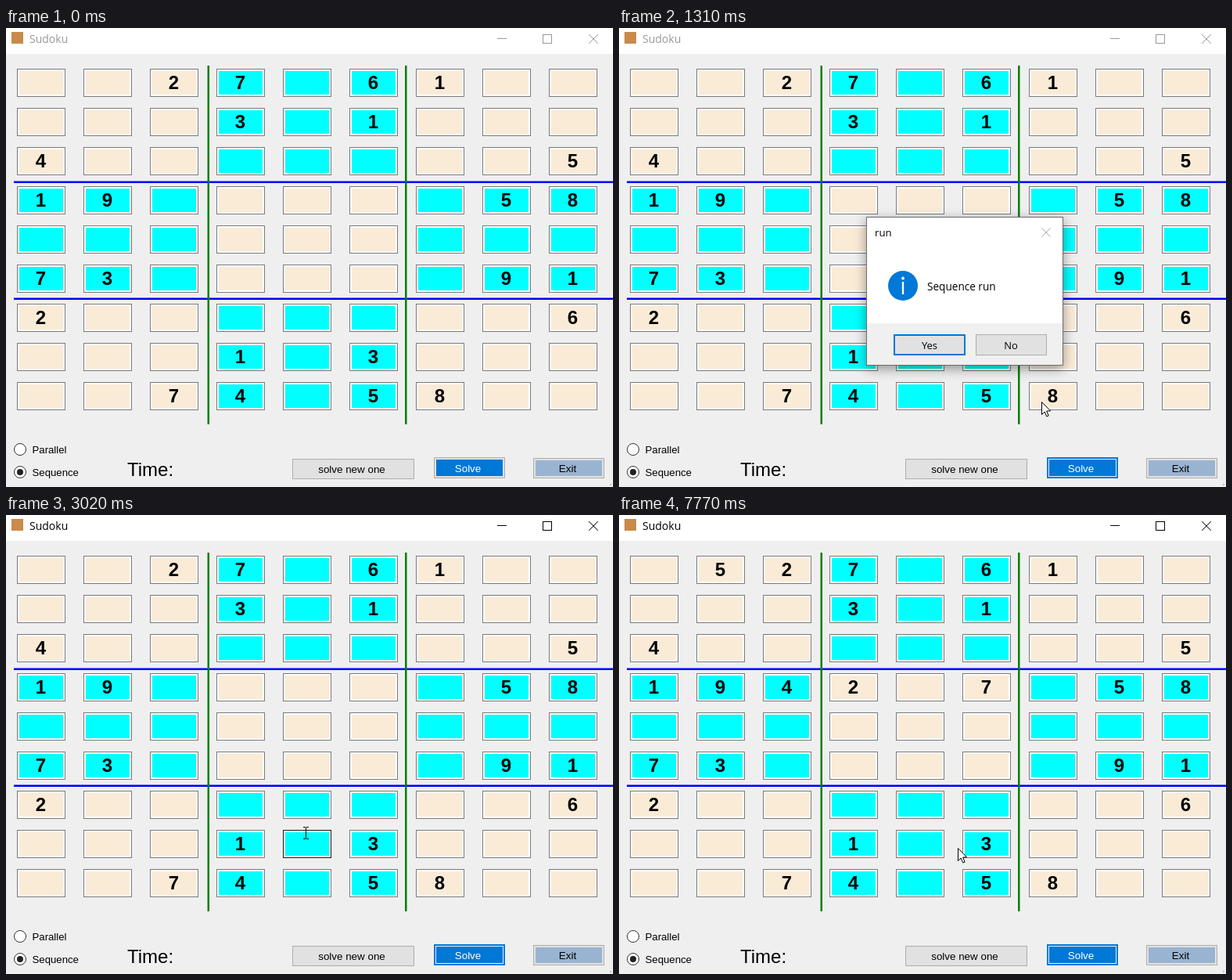
Animation, 776 px wide and 586 px high, one loop 8000 ms. Source, as an HTML page with a canvas:

```html
<!DOCTYPE html>
<html lang="en">
<head>
<meta charset="utf-8">
<title>Sudoku</title>
<style>
  html, body { margin: 0; width: 100%; height: 100%; overflow: hidden; background: #efefef; }
  canvas { display: block; }
</style>
</head>
<body>
<canvas id="stage" width="776" height="586"></canvas>
<script>
const W = 776, H = 586, LOOP = 8000, STEP = 77.8;
const stage = document.getElementById('stage').getContext('2d');
const layer = document.createElement('canvas');
layer.width = W;
layer.height = H;
const layerCtx = layer.getContext('2d');
let ctx = stage;

const SANS = '"Liberation Sans", Arial, sans-serif';
const UI = '"Open Sans", "Noto Sans", sans-serif';
const BLUE = [0, 120, 215], GRAY = [173, 173, 173], FACE = [225, 225, 225], HOT = [229, 241, 251];

const GIVEN = ['..27.61..', '...3.1...', '4.......5', '19.....58', '.........',
               '73.....91', '2.......6', '...1.3...', '..74.58..'];
const SOLVED = [
  { at: 7140, col: 1, row: 0, d: 5 },
  { at: 7370, col: 2, row: 3, d: 4 },
  { at: 7530, col: 3, row: 3, d: 2 },
  { at: 7770, col: 5, row: 3, d: 7 },
];

// The screen was sampled at a steady rate, so motion advances in even steps
const sampled = t => 58 + Math.floor((t - 46) / STEP) * STEP;
const ramp = (t, from, to) => Math.min(1, Math.max(0, (t - from) / (to - from)));
const easeOut = (p, power) => 1 - (1 - p) ** power;
const lerp = (a, b, p) => a + (b - a) * p;
const mix = (a, b, p) => `rgb(${a.map((v, i) => Math.round(lerp(v, b[i], p)))})`;

function rect(x, y, w, h, color) {
  ctx.fillStyle = color;
  ctx.fillRect(x, y, w, h);
}

function frame(x, y, w, h, border, fill, width = 1) {
  rect(x, y, w, h, border);
  rect(x + width, y + width, w - 2 * width, h - 2 * width, fill);
}

function text(str, x, y, font, color = '#000', align = 'left') {
  ctx.font = font;
  ctx.textAlign = align;
  ctx.fillStyle = color;
  ctx.fillText(str, x, y);
}

function cross(x, y, r, color) {
  ctx.strokeStyle = color;
  ctx.lineWidth = 1;
  ctx.beginPath();
  ctx.moveTo(x - r, y - r);
  ctx.lineTo(x + r, y + r);
  ctx.moveTo(x + r, y - r);
  ctx.lineTo(x - r, y + r);
  ctx.stroke();
}

function disc(x, y, r, fill, stroke) {
  ctx.beginPath();
  ctx.arc(x, y, r, 0, Math.PI * 2);
  ctx.fillStyle = fill;
  ctx.fill();
  if (stroke) {
    ctx.strokeStyle = stroke;
    ctx.lineWidth = 1;
    ctx.stroke();
  }
}

function titleBar(active) {
  const ink = active ? '#000' : '#999';
  rect(0, 0, W, 33, '#fff');
  rect(7, 5, 15, 15, '#c98a4a');
  text('Sudoku', 30, 19, `14px ${UI}`, ink);
  rect(628, 13, 12, 1, ink);
  ctx.strokeStyle = ink;
  ctx.lineWidth = 1;
  ctx.strokeRect(686.5, 8.5, 11, 11);
  cross(751, 14, 5.8, ink);
}

function digit(d, col, row) {
  text(d, 44.5 + col * 85, 78 + row * 50, `bold 24px ${SANS}`, '#000', 'center');
}

function board(t, s) {
  const hover = ramp(s, 2200, 2500) - ramp(s, 3250, 3860);
  for (let row = 0; row < 9; row++) {
    for (let col = 0; col < 9; col++) {
      const x = 14 + col * 85, y = 52 + row * 50;
      const odd = (Math.floor(row / 3) + Math.floor(col / 3)) % 2;
      const heat = row === 7 && col === 4 ? hover : 0;
      frame(x, y, 62, 36, mix([122, 122, 122], [23, 23, 23], heat), '#fff');
      rect(x + 3, y + 3, 56, 30, odd ? '#00ffff' : '#faebd7');
      if (GIVEN[row][col] !== '.') digit(GIVEN[row][col], col, row);
    }
  }
  for (const { at, col, row, d } of SOLVED) if (t >= at) digit(d, col, row);
  for (const y of [195.5, 344.5]) rect(10, y, 766, 2.5, '#0000ff');
  for (const x of [257.5, 510]) rect(x, 48, 2.5, 458, '#008000');
}

function radio(label, y, on) {
  disc(18, y, 7.5, '#fff', '#333');
  if (on) disc(18, y, 4, '#222');
  text(label, 33.5, y + 5, `13.2px ${SANS}`);
}

function footer(s) {
  const font = `13.4px ${SANS}`;
  radio('Parallel', 538, false);
  radio('Sequence', 567, true);
  text('Time:', 155, 572, `24px ${SANS}`);

  frame(366, 550, 156, 26, '#adadad', '#e1e1e1');
  text('solve new one', 442, 568, font, '#000', 'center');

  const heat = ramp(s, 220, 440);
  frame(547, 548, 91, 27, mix(GRAY, BLUE, heat), mix(FACE, HOT, heat), heat ? 2 : 1);
  rect(550, 551, 85, 21, '#0078d7');
  text('Solve', 590.5, 567, font, '#fff', 'center');

  frame(674, 549, 91, 26, '#adadad', '#e1e1e1');
  rect(677, 552, 85, 20, '#99b4d1');
  text('Exit', 718, 567, font, '#000', 'center');
  rect(772, 582, 2, 2, '#bfbfbf');
}

function dialogFace(s) {
  ctx.clearRect(0, 0, W, H);
  ctx.save();
  ctx.shadowColor = 'rgba(0,0,0,.4)';
  ctx.shadowBlur = 14;
  ctx.shadowOffsetY = 4;
  rect(316, 241, 252, 190, '#6e6e6e');
  ctx.restore();
  rect(317, 242, 250, 188, '#fff');
  rect(317, 377, 250, 53, '#f0f0f0');

  text('run', 327, 265.5, `13.2px ${UI}`);
  cross(546, 261, 5.5, '#aaa');
  disc(363, 329, 19, '#0078d7');
  disc(363, 319.5, 1.9, '#fff');
  rect(361.8, 324, 2.4, 16, '#fff');
  text('Sequence run', 394, 335, `13.6px ${UI}`);

  const yes = ramp(s, 1600, 1930);
  const no = ramp(s, 1400, 1540) - ramp(s, 1540, 1930);
  frame(351, 391, 92, 27, '#0078d7', mix(FACE, HOT, yes), 2);
  text('Yes', 397, 410, `13px ${UI}`, '#000', 'center');
  frame(456, 391, 91, 27, mix(GRAY, BLUE, no), mix(FACE, HOT, no));
  text('No', 501, 410, `13px ${UI}`, '#000', 'center');
}

function dialog(s) {
  const shown = easeOut(ramp(s, 1036, 1225), 2) - ramp(s, 2190, 2370);
  if (shown <= 0) return;
  ctx = layerCtx;
  dialogFace(s);
  ctx = stage;
  const scale = 1 - .05 * (1 - shown);
  ctx.save();
  ctx.globalAlpha = shown;
  ctx.translate(442, 335.5);
  ctx.scale(scale, scale);
  ctx.drawImage(layer, -442, -335.5);
  ctx.restore();
}

function arrow(x, y) {
  const shape = [[0, 0], [0, 16], [3.7, 12.5], [6.3, 18.5], [8.7, 17.5], [6.1, 11.6], [11, 11.3]];
  ctx.beginPath();
  for (const [dx, dy] of shape) ctx.lineTo(x + .5 + dx, y + .5 + dy);
  ctx.closePath();
  ctx.fillStyle = '#fff';
  ctx.fill();
  ctx.strokeStyle = '#000';
  ctx.lineWidth = 1;
  ctx.stroke();
}

function caret(x, y) {
  rect(x + 2, y - 6, 1, 14, '#000');
  for (const dy of [-7, 8]) {
    rect(x - 1, y + dy, 3, 1, '#000');
    rect(x + 3, y + dy, 3, 1, '#000');
  }
}

// Enters over Solve, sweeps to Yes, then drifts off to the right
function pointer(t, s) {
  if (t < 280) return;
  const enter = easeOut(ramp(s, 280, 680), 2);
  const sweep = ramp(s, 1150, 1770);
  const leave = easeOut(ramp(s, 3080, 3400), 3);
  const x = lerp(lerp(lerp(583, 569, enter), 381, sweep * sweep * (3 - 2 * sweep)), 433, leave);
  const y = lerp(lerp(lerp(564, 552, enter), 405, easeOut(sweep, 2.5)), 425, leave);
  const overCell = t >= 2240 && t < 3170;
  (overCell ? caret : arrow)(Math.round(x), Math.round(y));
}

function draw(t) {
  const s = sampled(t);
  rect(0, 0, W, H, '#efefef');
  titleBar((t >= 990 && t < 1080) || t >= 2240);
  board(t, s);
  footer(s);
  dialog(s);
  pointer(t, s);
}

let start;
function tick(now) {
  start ??= now;
  draw((now - start) % LOOP);
  requestAnimationFrame(tick);
}
draw(0);
requestAnimationFrame(tick);
</script>
</body>
</html>
```
